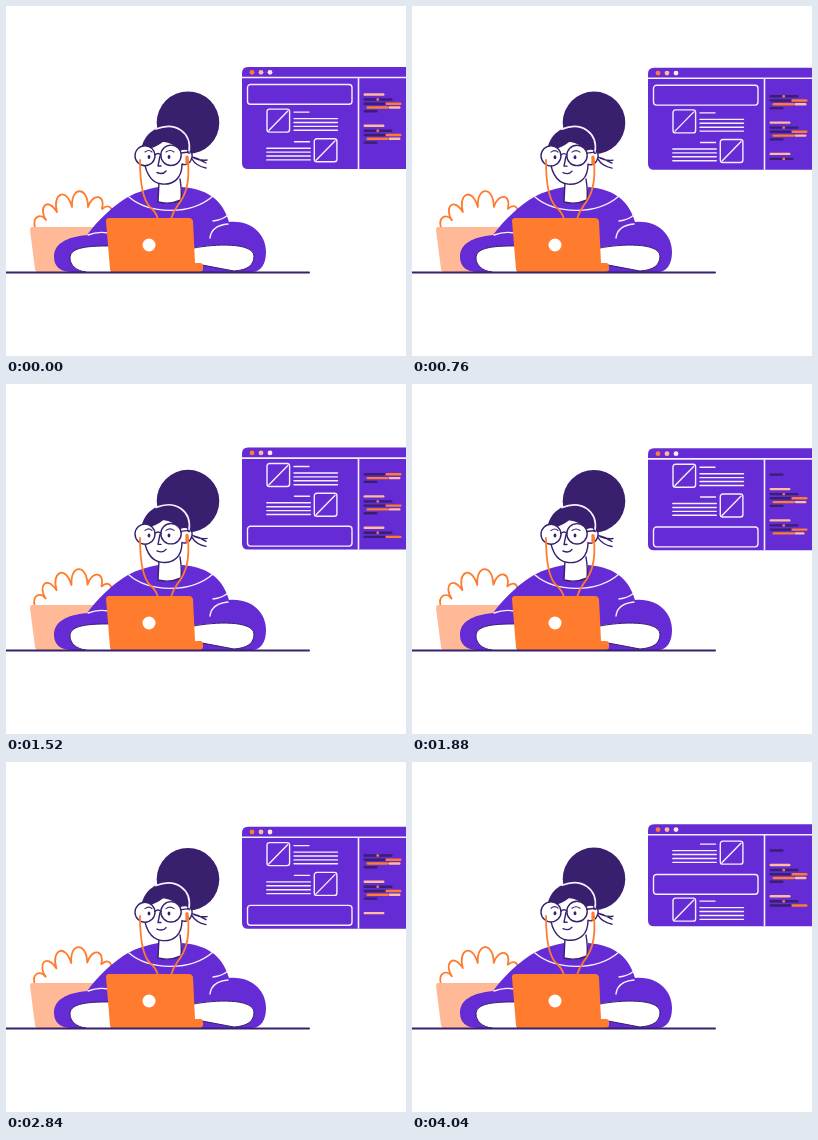
Recreate the animation shown at these times as an HTML page. Size 400 px wide and 350 px high, loop 4.08 s.

```html
<!DOCTYPE html>
<html lang="en">
<head>
<meta charset="utf-8">
<title>Designer at work</title>
<style>
  html, body { margin: 0; width: 100%; height: 100%; overflow: hidden; background: #fff; }
  svg { display: block; width: 400px; height: 350px; }
  .ink { fill: none; stroke: #38206f; stroke-width: 1.4; }
  .wire { fill: none; stroke: #ff7b2e; stroke-width: 1.8; }
  .seam { fill: none; stroke: #f6efff; stroke-width: 1.4; }
  .wire, .ink, .seam { stroke-linecap: round; stroke-linejoin: round; }
  .purple { fill: #652bd4; }
  .dark { fill: #38206f; }
  .orange { fill: #ff7b2e; }
  .peach { fill: #ffb997; }
  .white { fill: #fff; }
</style>
</head>
<body>
<svg viewBox="0 0 400 350" xmlns="http://www.w3.org/2000/svg">
  <!-- plant -->
  <g id="plant">
    <path class="wire" d="M29 222 C26 210 35 207 40 214 C32 202 41 190 51 206 C46 188 60 180 66 201 C65 180 82 180 82 201 C87 186 100 189 96 203 C102 198 106 201 106 206 L106 222" style="fill:#fff"/>
  </g>
  <path class="peach" d="M26 221 H108 V266 H31 Q29.5 266 29 263 L24 224 Q24 221 26 221Z"/>

  <!-- body -->
  <path class="purple" d="M48 251 C48 238 60 231 81 229 C92 214 108 199 122 191 C131 186 141 183 152 181 L152 196 Q164 199 175 194 L176 181 C198 183 216 191 223 216 C245 214 260 228 260 246 C260 258 255 266 246 266 H66 C54 266 48 260 48 251Z"/>
  <path class="white" d="M64 252 C64 243 76 239.5 105 240 V266 H80 C70 265 64 259 64 252Z"/>
  <path class="white" d="M186 242 C208 238 247 236 248 250 C248 259 242 264 228 265 L186 257Z"/>
  <path class="ink" d="M105 240 C76 239.5 64 243 64 252 C64 259 70 265 80 266 M188 242 C208 238 247 236 248 250 C248 259 242 264 228 265 L196 259" style="stroke-width:1"/>
  <path class="seam" d="M123 191 C143 208 184 210 207 190 M204 232 C205 223 211 219 222 218 M207 215 Q216 214 222 209 M82 229 Q92 225 102 227"/>

  <!-- neck -->
  <path class="white" d="M153 172 L152 196 Q164 199 175 194 L175 168Z"/>
  <path class="ink" d="M153 176 L152 196 Q164 199 175 194 Q176 185 174 173"/>

  <!-- head -->
  <g id="head">
    <circle class="dark" cx="182" cy="116.7" r="31.3"/>
    <path class="dark" d="M135 146 C136 130 148 120 163 120 C178 120 187 132 186 148 L160 150Z"/>
    <path class="ink" d="M183 150 Q192 152 200 157 M186 153 Q190 160 200 162 M188 152 Q195 155 201 154"/>
    <path class="ink" d="M137 144 Q150 141 157 135 Q168 136 174 144 C181 141 187 145 186 151 C185 157 180 160 176 158 C176 172 168 179 156 178 C145 177 138 168 137 144Z" style="fill:#fff"/>
    <path class="ink" d="M163 121 C178 120 185 132 183 146" style="stroke-width:3.6"/>
    <path class="seam" d="M150 123 C170 115 186 127 183 146" style="stroke-width:1.7"/>
    <g class="ink">
      <circle class="white" cx="139" cy="149.7" r="10"/>
      <circle class="white" cx="165" cy="149.3" r="10.2"/>
      <path d="M149 149 Q152 146 155 149 M175 147 L183 146 M154 150 L152 160 H155 M151 166.5 Q157 169 160 165"/>
      <path d="M139 146 Q143 143 146 146 M160 146 Q164 143 168 146" style="stroke-width:1.1"/>
    </g>
    <ellipse class="dark" cx="143" cy="151" rx="1.4" ry="2"/>
    <ellipse class="dark" cx="163" cy="151" rx="1.4" ry="2"/>
    <path class="wire" d="M181 151 V157" style="stroke-width:3.2"/>
  </g>
  <path class="wire" d="M134 154 C134 177 137 194 144 201 Q150 206 152 213 M182 154 C184 179 179 190 172 199 Q167 206 165 213"/>

  <!-- laptop and table -->
  <path class="orange" d="M103 212 H183 Q186 212 187 215 L189 257 H194 Q197 257 197 260 V263 Q197 266 193 266 H107 Q104 266 104 263 L100 215 Q100 212 103 212Z"/>
  <circle class="white" cx="143" cy="239" r="6.5"/>
  <path class="ink" d="M0 266.5 H303" style="stroke-width:2"/>

  <!-- browser window -->
  <g id="win">
    <path class="purple" d="M242 61 H410 V163 H242 Q236 163 236 157 V67 Q236 61 242 61Z"/>
    <path class="seam" d="M236 71.5 H410 M352.5 71.5 V163" style="stroke-width:1.6;stroke-linecap:butt"/>
    <circle class="orange" cx="246" cy="66.3" r="2.4"/>
    <circle class="peach" cx="255" cy="66.3" r="2.4"/>
    <circle cx="264" cy="66.3" r="2.4" fill="#ffe9de"/>
    <g id="banner"><rect class="seam" x="241.5" y=".5" width="104.5" height="19.8" rx="3"/></g>
    <g id="cardA"></g>
    <g id="cardB"></g>
    <g id="code" fill="none" stroke-width="2.4" stroke-linecap="round"></g>
  </g>
</svg>
<script>
const LOOP = 4080, FLOAT = 5000;
const $ = id => document.getElementById(id);
const DARK = '#38206f', ORANGE = '#ff7b2e', PEACH = '#ffbb9c';

// cards: picture box, short title, four lines of copy
function fillCard(id, imgX, textX, titleX) {
  const rows = [0, 1, 2, 3].map(i => `M${textX} ${9.8 + i * 3.9}h43.5`).join('');
  $(id).innerHTML =
    `<rect class="seam" x="${imgX}" y=".3" width="22.6" height="23" rx="2.5"/>
     <path class="seam" d="M${imgX + 2} 21.5l18.6 -19M${titleX} 3.3h15${rows}"/>`;
}
fillCard('cardA', 261, 288, 288);
fillCard('cardB', 308.3, 260.8, 288.5);

// code block rows: offset, then [colour, from, to] pieces
const ROWS = [
  [0, [PEACH, 358, 378]],
  [5, [DARK, 358, 370], [DARK, 373, 386], [ORANGE, 371, 372.6]],
  [9.2, [DARK, 358, 379], [ORANGE, 380, 395]],
  [13, [ORANGE, 361, 382], [PEACH, 383, 394]],
  [16.8, [DARK, 358, 371]]
];
const PITCH = 31.3, TOP = 88.5, LINES = 20;

const lines = Array.from({ length: LINES }, (_, i) => {
  const [dy, ...parts] = ROWS[i % 5];
  const end = Math.max(...parts.map(p => p[2]));
  const y = TOP + Math.floor(i / 5) * PITCH + dy;
  const pieces = parts.map(([color, from, to]) => {
    const el = document.createElementNS('http://www.w3.org/2000/svg', 'path');
    el.setAttribute('stroke', color);
    $('code').append(el);
    return { el, from, to };
  });
  return { y, end, pieces };
});

// time, rows typed, scroll
const TYPING = [
  [0, 10, 0], [760, 11.82, 4], [1520, 13, 10], [2280, 15, 27],
  [2840, 16, 35], [3520, 17.3, 41], [4080, 18.1, 50]
];
function typingAt(t) {
  const i = Math.max(1, TYPING.findIndex(k => k[0] >= t));
  const a = TYPING[i - 1], b = TYPING[i];
  const u = (t - a[0]) / (b[0] - a[0]);
  return [1, 2].map(c => a[c] + (b[c] - a[c]) * u);
}

function drawCode(t) {
  const [typed, scroll] = typingAt(t);
  lines.forEach((line, i) => {
    const shown = Math.min(1, Math.max(0, typed - i));
    const y = line.y - scroll;
    const edge = 358 + (line.end - 358) * shown;
    for (const { el, from, to } of line.pieces) {
      const x = Math.min(to, edge);
      const visible = shown > 0 && y > 85.8 && x > from;
      el.setAttribute('d', visible ? `M${from + .7} ${y}H${Math.max(from + .8, x - .7)}` : '');
    }
  });
}

const ease = u => u < .5 ? 4 * u ** 3 : 1 - (2 - 2 * u) ** 3 / 2;
const step = (t, start, length = 500) => ease(Math.min(1, Math.max(0, (t - start) / length)));

// three layouts for each block
const SPOTS = { banner: [78, 139.2, 110.7], cardA: [102.8, 76.6, 134.6], cardB: [132.4, 106.4, 77.6] };

function draw(t) {
  const lift = (1 - Math.cos(2 * Math.PI * t / FLOAT)) / 2;
  const first = step(t, 900), second = step(t, 2900);
  const move = (id, x, y) => $(id).setAttribute('transform', `translate(${x} ${y})`);
  move('win', 0, 3.9 * lift);
  move('head', 0, .6 * lift);
  $('plant').setAttribute('transform', `rotate(${-1.6 * lift} 66 230)`);
  for (const [id, [a, b, c]] of Object.entries(SPOTS))
    move(id, 0, a + (b - a) * first + (c - b) * second);
  drawCode(t);
}

const begin = performance.now();
function tick() {
  const t = (performance.now() - begin) % LOOP;
  draw(Math.floor(t / 40) * 40);
  requestAnimationFrame(tick);
}
draw(0);
requestAnimationFrame(tick);
</script>
</body>
</html>
```
